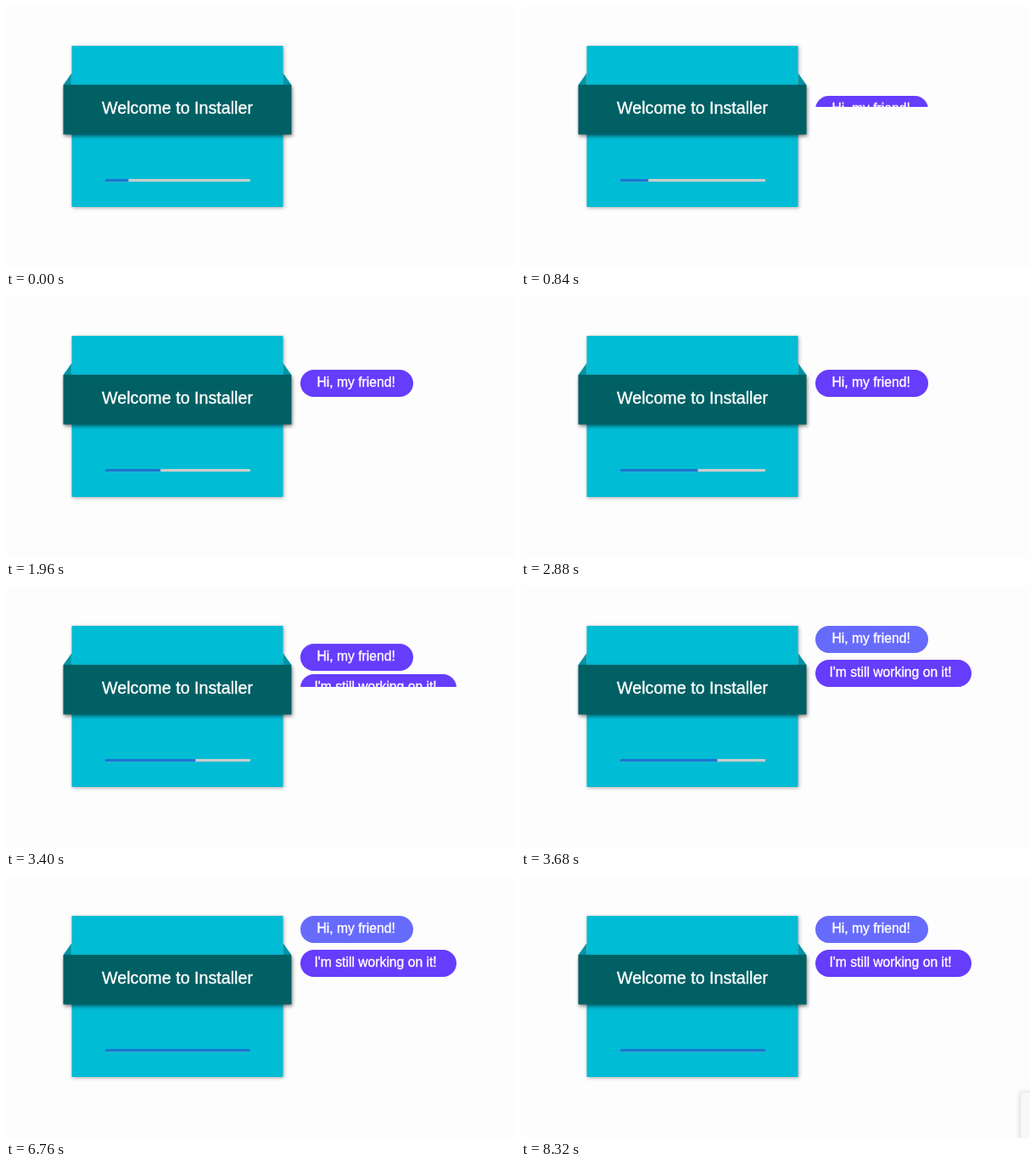
An HTML page for the animation above (8360 ms loop, 600 by 309 pixels).

```html
<!DOCTYPE html>
<html lang="en">
<head>
<meta charset="utf-8">
<title>Installer</title>
<style>
  html, body { margin: 0; width: 100%; height: 100%; overflow: hidden; background: #fefdfe; }
  svg { display: block; width: 600px; height: 309px; }
  text {
    font-family: "Liberation Sans", Arial, sans-serif;
    font-size: 15.7px;
    text-anchor: middle;
    fill: #fff;
    stroke: #fff;
    stroke-width: .35px;
  }
  .title { font-size: 19.7px; }
  .card { fill: #00bcd4; filter: drop-shadow(1px 1px 2px rgba(0, 0, 0, .35)); }
  .ribbon { fill: #006064; filter: drop-shadow(1px 2px 2px rgba(0, 0, 0, .5)); }
  .fold { fill: #0097a7; }
  .pill { fill: #663cfd; }

  .bar, .first, .second, .first .pill, .corner {
    animation: 8360ms linear infinite;
  }
  .bar { animation-name: fill-up; }
  .first { animation-name: first-rise; }
  .second { animation-name: second-rise; }
  .first .pill { animation-name: fade-old; }
  .corner { animation-name: appear; }

  @keyframes fill-up {
    0%, 7.656% { width: 27.5px; }
    67.7%, 100% { width: 171px; }
  }
  @keyframes first-rise {
    0%, 7.6% { transform: translateY(32px); }
    13.58%, 37.86% { transform: none; }
    43.84%, 100% { transform: translateY(-40px); }
  }
  @keyframes second-rise {
    0%, 37.86% { transform: translateY(32px); }
    43.84%, 100% { transform: none; }
  }
  @keyframes fade-old {
    0%, 41.2% { fill: #663cfd; }
    43.84%, 100% { fill: #676bfc; }
  }
  @keyframes appear {
    0%, 85% { opacity: 0; }
    88%, 100% { opacity: 1; }
  }
</style>
</head>
<body>
<svg viewBox="0 0 600 309">
  <defs>
    <clipPath id="chat"><rect x="340" y="0" width="260" height="119"/></clipPath>
  </defs>

  <rect class="card" x="77.5" y="47" width="249" height="190"/>
  <path class="fold" d="M67.5 93L77.5 79V93zM336.5 93L326.5 79V93z"/>
  <rect class="ribbon" x="67.5" y="93" width="269" height="58.5"/>
  <text class="title" x="202" y="127">Welcome to Installer</text>

  <rect x="117" y="204" width="171" height="3.2" rx="1" fill="#c8cccc"/>
  <rect class="bar" x="117" y="204" width="27.5" height="3.2" rx="1" fill="#1976d2"/>

  <g clip-path="url(#chat)">
    <g class="first">
      <rect class="pill" x="347" y="87" width="133" height="32" rx="16"/>
      <text x="412.6" y="107">Hi, my friend!</text>
    </g>
    <g class="second">
      <rect class="pill" x="347" y="87" width="184" height="32" rx="16"/>
      <text x="435.6" y="107">I'm still working on it!</text>
    </g>
  </g>

  <rect class="corner" x="588.5" y="254.5" width="30" height="70" rx="4"
        fill="#f8f8f9" stroke="#e2e2e4" style="filter: drop-shadow(0 1px 3px rgba(0, 0, 0, .14))"/>
</svg>
</body>
</html>
```
